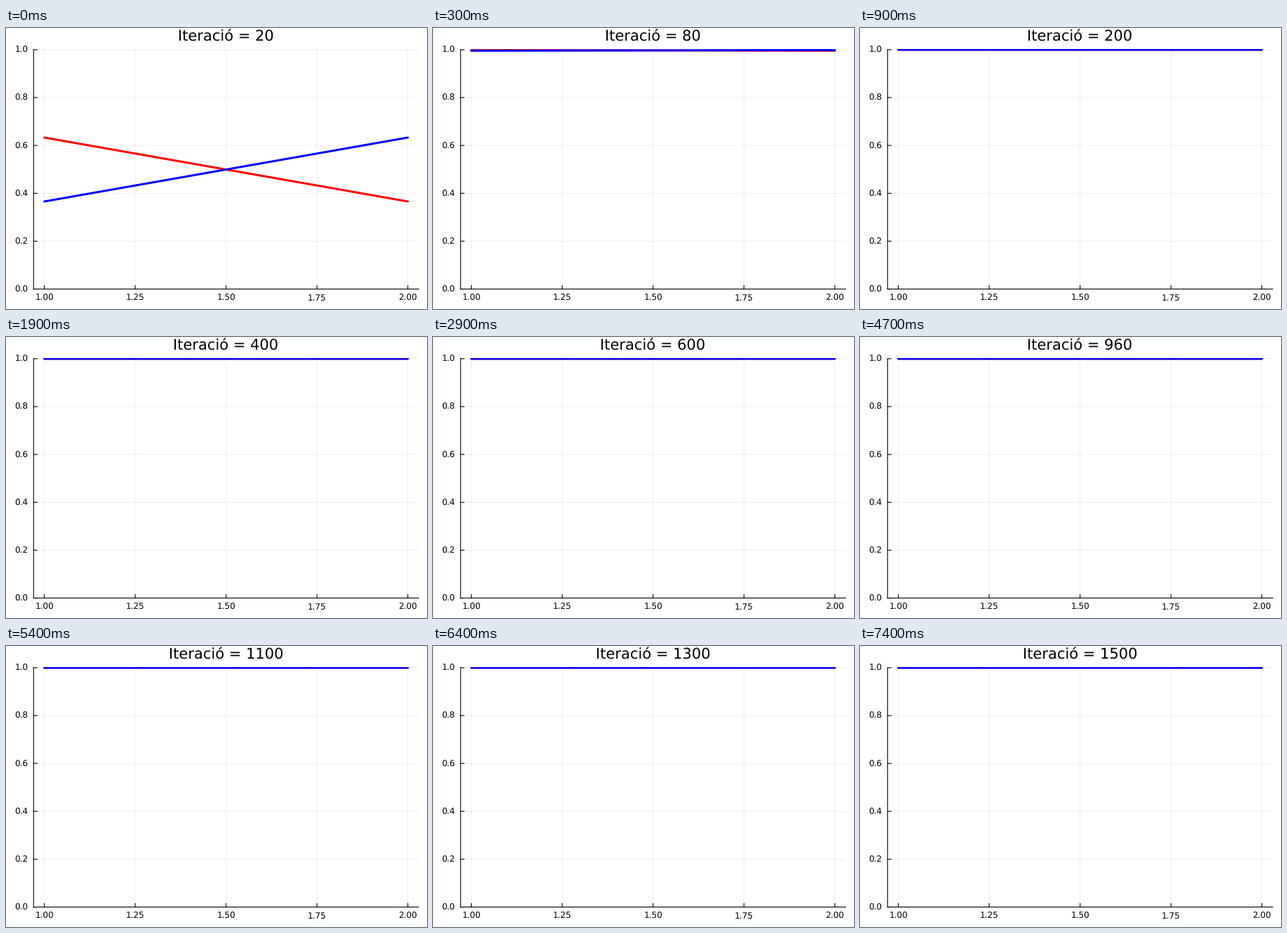
Write a matplotlib script that moves like this. It is 600x400 px and loops after 7.5 s.

```python
import numpy as np
import matplotlib.pyplot as plt
from matplotlib.animation import FuncAnimation
from matplotlib.patches import Rectangle

W, H, DPI = 600, 400, 100
FRAMES, STEP = 75, 20
LEFT, RIGHT, TOP, BOTTOM = 39.3, 588.2, 30.9, 371.6
X1, X2 = 54.6, 572.7
PT = 72 / DPI

plt.rcParams.update({"font.family": "DejaVu Sans", "text.hinting": "none",
                     "text.hinting_factor": 1, "path.snap": False})

fig = plt.figure(figsize=(W / DPI, H / DPI), dpi=DPI, facecolor="white")
ax = fig.add_axes([0, 0, 1, 1])
ax.set(xlim=(0, W), ylim=(H, 0))
ax.axis("off")


def px(x):
    return X1 + (x - 1) * (X2 - X1)


def py(y):
    return BOTTOM - y * (BOTTOM - TOP)


def stroke(xs, ys, width, color="black", **kw):
    return ax.plot(xs, ys, color=color, lw=width * PT, **kw)[0]


def label(x, y, s, size, ha):
    return ax.text(x, y, s, fontsize=size * PT, ha=ha, va="baseline")


def draw_axes():
    for x in np.linspace(1, 2, 5):
        u = px(x)
        stroke([u, u], [TOP, BOTTOM], 0.7, alpha=0.1)
        stroke([u, u], [BOTTOM, BOTTOM - 5], 1.1)
        label(u, 387.5, f"{x:.2f}", 11.7, "center")
    for y in np.linspace(0, 1, 6):
        v = py(y)
        stroke([LEFT, RIGHT], [v, v], 0.7, alpha=0.1)
        stroke([LEFT, LEFT + 5], [v, v], 1.1)
        label(31.3, v + 4.2, f"{y:.1f}", 11.7, "right")
    stroke([LEFT, LEFT], [TOP, BOTTOM], 1.1)
    stroke([LEFT, RIGHT], [BOTTOM, BOTTOM], 1.1)


draw_axes()
clip = Rectangle((LEFT, TOP - 0.5), RIGHT - LEFT, BOTTOM - TOP + 0.5,
                 transform=ax.transData)
curves = []
for color in ("red", "blue"):
    line = stroke([X1, X2], [0, 0], 3, color, solid_capstyle="round", zorder=3)
    line.set_clip_path(clip)
    curves.append(line)
title = label(313.5, 18.3, "", 20.7, "center")


def levels(n):
    """Logistic growth of the leading and trailing value."""
    growth = 0.1 * (n - STEP)
    return 1 / (1 + np.exp(-(growth + np.array([0.545, -0.55]))))


def update(i):
    n = STEP * (i + 1)
    values = levels(n)
    curves[0].set_ydata(py(values))
    curves[1].set_ydata(py(values[::-1]))
    title.set_text(f"Iteració = {n}")
    return [*curves, title]


anim = FuncAnimation(fig, update, frames=FRAMES, interval=100,
                     repeat=True, repeat_delay=0, blit=False)
plt.show()
```
